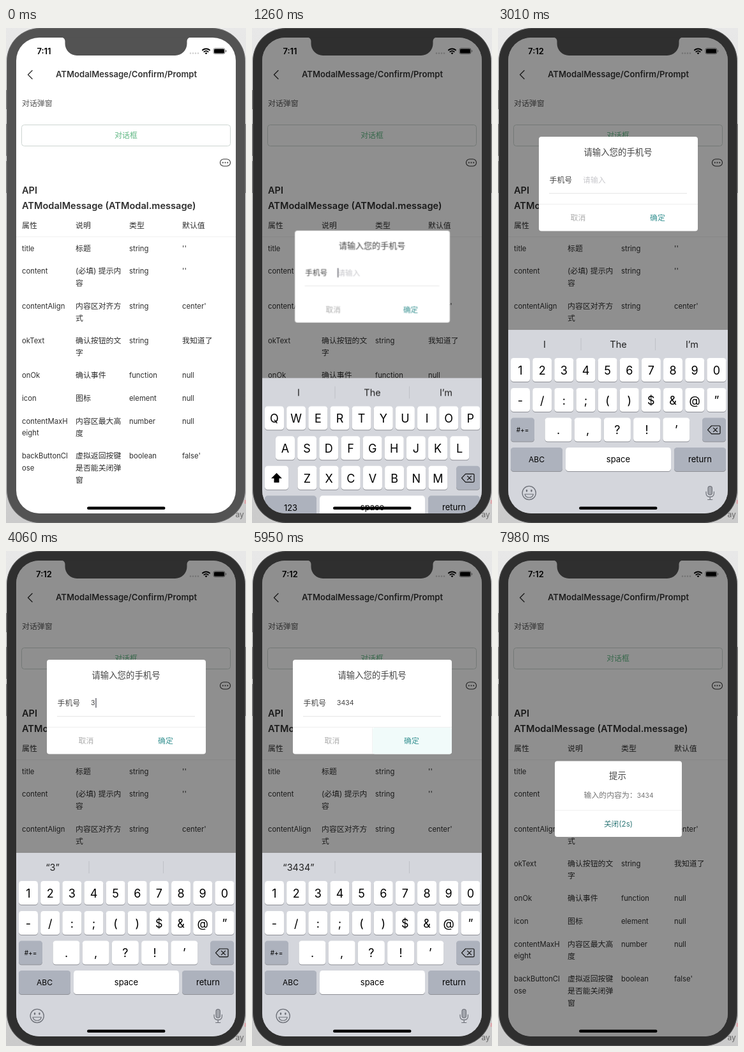
An HTML page for the animation above (8 s loop, 376x774 px).

```html
<!DOCTYPE html>
<html lang="zh-CN">
<head>
<meta charset="utf-8">
<title>Modal prompt demo</title>
<style>
html, body { margin: 0; width: 100%; height: 100%; overflow: hidden; }
body { background: linear-gradient(#e8e8e8, #cbcbcb); }
svg { display: block; width: 376px; height: 774px; }
text { font-family: Inter, "Noto Sans CJK SC", "Noto Sans CJK", "Noto Sans", sans-serif; white-space: pre; }
.bezel, .mask, .lift, .pop, .notice, .board { animation: 8s linear infinite; }
.bezel { animation-name: bezel; }
.mask { animation-name: mask; }
.lift { animation-name: lift; }
.pop { animation-name: pop; transform-origin: 188.5px 243.5px; }
.notice { animation-name: notice; transform-origin: 188.5px 388px; }
.board { animation-name: board; }

@keyframes bezel {
  0%, 9.7% { fill: #535353; }
  10.4%, 100% { fill: #2f2f2f; }
}
@keyframes mask {
  0%, 12.4% { opacity: 0; }
  15%, 100% { opacity: 1; }
}
@keyframes lift {
  0%, 15.9% { transform: translateY(145px); animation-timing-function: cubic-bezier(.2, .8, .2, 1); }
  20.2%, 100% { transform: none; }
}
@keyframes pop {
  0%, 13.1% { opacity: 0; transform: scale(.65); animation-timing-function: ease-out; }
  15% { opacity: 1; }
  16.5%, 74.8% { opacity: 1; transform: none; }
  75.7%, 100% { opacity: 0; transform: scale(.9); }
}
@keyframes notice {
  0%, 75.4% { opacity: 0; transform: scale(.7); animation-timing-function: ease-out; }
  76.8% { opacity: 1; }
  77.3%, 100% { opacity: 1; transform: none; }
}
@keyframes board {
  0%, 14.45% { transform: translateY(302px); animation-timing-function: cubic-bezier(.2, .8, .2, 1); }
  19.95%, 75.49% { transform: none; animation-timing-function: cubic-bezier(.2, .8, .2, 1); }
  80.99%, 100% { transform: translateY(258px); }
}
</style>
</head>
<body>
<svg id="stage" viewBox="0 0 376 774" xmlns="http://www.w3.org/2000/svg"></svg>
<script>
const LOOP = 8000;
const NUMBER = '3434';
const TYPED_AT = [4010, 4480, 4830, 5180, 6060];

const hasHan = s => /[\u4e00-\u9fff]/.test(s);

// y is the middle of the line
function text(x, y, str, { size = hasHan(str) ? 11.9 : 11.3, fill = '#2e2e2e', mid = false, weight = 400 } = {}) {
  return `<text x="${x}" y="${y + size * .37}" font-size="${size}" fill="${fill}" font-weight="${weight}"` +
    `${mid ? ' text-anchor="middle"' : ''}>${str.replace(/&/g, '&amp;')}</text>`;
}
const centered = (x, y, str, size, fill, weight) => text(x, y, str, { size, fill, weight, mid: true });
const rect = (x, y, w, h, fill, r = 0) =>
  `<rect x="${x}" y="${y}" width="${w}" height="${h}" rx="${r}" fill="${fill}"/>`;
const line = (d, stroke, width = 1) =>
  `<path d="${d}" fill="none" stroke="${stroke}" stroke-width="${width}" stroke-linecap="round" stroke-linejoin="round"/>`;
const during = (spans, body) => `<g data-on="${spans}">${body}</g>`;

function table() {
  const cols = [25, 109, 193, 276];
  const rows = [
    [309, '属性', '说明', '类型', '默认值'],
    [344.5, 'title', '标题', 'string', "''"],
    [380, 'content', '(必填) 提示内|容', 'string', "''"],
    [434.5, 'contentAlign', '内容区对齐方|式', 'string', "center'"],
    [489, 'okText', '确认按钮的文|字', 'string', '我知道了'],
    [543, 'onOk', '确认事件', 'function', 'null'],
    [579, 'icon', '图标', 'element', 'null'],
    [614.5, 'contentMaxH|eight', '内容区最大高|度', 'number', 'null'],
    [669, 'backButtonCl|ose', '虚拟返回按键|是否能关闭弹|窗', 'boolean', "false'"]
  ];
  return rows.map(([y, ...cells]) => cells.map((cell, c) =>
    cell.split('|').map((part, i) => text(cols[c], y + i * 18.6, part)).join('')).join('')).join('');
}

function page() {
  return rect(16, 15, 344, 744, '#fff') +
    line('M41 66.5L34.5 73L41 79.5', '#333', 1.4) +
    centered(188.5, 72.5, 'ATModalMessage/Confirm/Prompt', 13.1, '#333', 600) +
    text(25, 117.5, '对话弹窗', { fill: '#555' }) +
    '<rect x="24.5" y="151.5" width="327" height="33" rx="4" fill="none" stroke="#cdd5d1"/>' +
    centered(188, 168, '对话框', 11.9, '#62b885') +
    '<rect x="335.5" y="205" width="16" height="11" rx="5.5" fill="none" stroke="#333" stroke-width="1.1"/>' +
    [339.8, 343.5, 347.2].map(x => `<circle cx="${x}" cy="210.5" r="1" fill="#333"/>`).join('') +
    text(25, 254, 'API', { size: 14.6, weight: 600 }) +
    text(25, 278, 'ATModalMessage (ATModal.message)', { size: 14.6, weight: 600 }) +
    rect(16, 326, 344, 1, '#f0f0f0') +
    table();
}

function statusBar() {
  const clock = t => centered(59.5, 36, t, 13, '#000', 600);
  return during('0-2100', clock('7:11')) + during('2100-8000', clock('7:12')) +
    [289, 293, 297, 301].map(x => `<circle cx="${x}" cy="39.5" r="1.2" fill="#000" opacity=".2"/>`).join('') +
    line('M308 34.6a8 8 0 0 1 11 0', '#000', 2) +
    line('M310.3 37.2a4.7 4.7 0 0 1 6.4 0', '#000', 1.8) +
    '<path d="M311.6 39.2a2.8 2.8 0 0 1 3.8 0L313.5 41.2Z"/>' +
    '<rect x="325" y="31.8" width="18" height="8.6" rx="2.4" fill="none" stroke="#000" stroke-opacity=".6" stroke-width=".8"/>' +
    rect(326, 32.8, 16, 6.6, '#000', 1.5) + rect(344, 34.6, 1.2, 3, '#555', .6);
}

function prompt() {
  const caret = x => rect(x, 230, 1.5, 15, '#6a6a74');
  const typed = [...NUMBER].map((_, i) => {
    const end = TYPED_AT[i + 1];
    return during(`${TYPED_AT[i]}-${end}`, text(133, 237.5, NUMBER.slice(0, i + 1), { size: 10.5, fill: '#444' })) +
      during(`${TYPED_AT[i]}-${Math.min(end, 5700)}`, caret(133.5 + 6.7 * (i + 1)));
  }).join('');
  return `<g class="lift"><g class="pop">${
    rect(64, 170, 249, 147.5, '#fff', 4) +
    centered(188, 194, '请输入您的手机号', 13.4, '#444') +
    text(80.5, 237.5, '手机号', { fill: '#444' }) +
    during('0-4010', text(133, 237.5, '请输入', { fill: '#c9c9cd' })) +
    during('1050-1830 2350-2700 3250-3660', caret(132.5)) +
    typed +
    rect(80, 258, 216, 1, '#e6e6e6') +
    during('5870-6060', rect(189, 276, 124, 41.5, '#f1fbfa', 4) + rect(188, 276, 1, 41, '#f3f3f3')) +
    during('1320-6060', rect(64, 275, 249, 1, '#efefef')) +
    centered(125.5, 297, '取消', 11.9, '#adadad') +
    centered(250, 297, '确定', 11.9, '#3b9494')
  }</g></g>`;
}

function notice() {
  const close = s => centered(188.5, 427, `关闭(${s}s)`, 11.7, '#2f7777');
  return `<g class="notice">${
    rect(89, 328.5, 199, 118.5, '#fff', 4) +
    centered(187.5, 351.5, '提示', 13.4, '#444', 500) +
    `<text x="134.5" y="386" font-size="11.9" fill="#757575">输入的内容为：<tspan font-size="10.2">${NUMBER}</tspan></text>` +
    during('6200-8000', rect(89, 405, 199, 1, '#f0f0f0')) +
    during('6000-7040', close(3)) + during('7040-8000', close(2))
  }</g>`;
}

const GREY = '#adb2bd';
const key = (x, y, w, fill = '#fff') => rect(x, y + 1, w, 37, '#8e9096', 4.5) + rect(x, y, w, 37, fill, 4.5);
const keyRow = (chars, first, y, pitch = 34.15, w = 30) => [...chars].map((c, i) => {
  const x = first + i * pitch;
  return key(x - w / 2, y, w) + centered(x, y + 19, c, 18, '#000');
}).join('');

// Enlarged key shown while a digit is held down
function keyPopup(digit) {
  const x = 35 + (digit - 1) * 34.15;
  return `<path transform="translate(${x} 0)" fill="#fff" stroke="#b4b7bd" stroke-width=".7"
    d="M-17 464h34q7 0 7 7v26c0 9-9 9-9 19v33q0 4-4 4h-22q-4 0-4-4v-33c0-10-9-10-9-19v-26q0-7 7-7z"/>` +
    centered(x, 488, digit, 27, '#000');
}

function keyboard() {
  const shift = '<path d="M38.5 620.5L47 629H42.5V635.5H34.5V629H30Z"/>';
  const letters = keyRow('QWERTYUIOP', 35, 516) + keyRow('ASDFGHJKL', 52, 563) +
    keyRow('ZXCVBNM', 86.5, 609.5) + key(20, 609.5, 37) + shift + centered(60.5, 674.5, '123', 13, '#000');
  const symbols = keyRow('1234567890', 35, 516) + keyRow('-/:;()$&@”', 35, 563) +
    keyRow('.,?!’', 94.5, 609.5, 46.2, 42) + key(20, 609.5, 37, GREY) +
    centered(38.5, 628.5, '#+=', 10, '#000') + centered(60.5, 674.5, 'ABC', 12, '#000');
  const hint = (x, s) => centered(x, 494.5, s, 14.5, '#222');
  const hints = rect(16, 472, 344, 38, '#d4d6dc') +
    rect(129.5, 485, 1, 19, '#bec0c6') + rect(246, 485, 1, 19, '#bec0c6') +
    during('0-4010', hint(73, 'I') + hint(188.5, 'The') + hint(304, 'I’m')) +
    [...NUMBER].map((_, i) => during(`${TYPED_AT[i]}-${TYPED_AT[i + 1]}`, hint(73, `“${NUMBER.slice(0, i + 1)}”`))).join('');
  const erase = line('M328.5 628.3L334.5 622H346.5Q348 622 348 623.5V633.2Q348 634.7 346.5 634.7H334.5Z', '#111', 1.2) +
    line('M337.5 625.3l6 6m0-6l-6 6', '#111', 1.2);
  const emoji = '<circle cx="48.7" cy="727" r="10.6" fill="none" stroke="#6d7078" stroke-width="1.3"/>' +
    '<ellipse cx="45" cy="723.5" rx="1.2" ry="1.9" fill="#6d7078"/><ellipse cx="52.4" cy="723.5" rx="1.2" ry="1.9" fill="#6d7078"/>' +
    line('M42 729H55.4Q54 734.3 48.7 734.3T42 729Z', '#6d7078', 1.1);
  const mic = '<rect x="329" y="716.5" width="6.4" height="13.5" rx="3.2" fill="#a3a6ad" stroke="#6d7078" stroke-width="1.1"/>' +
    line('M326 725v2.2q0 6 6.2 6t6.2-6V725M332.2 733.2v4.3M328.6 737.5h7.2', '#6d7078', 1.2);
  const popups = [...NUMBER].map((d, i) =>
    during(`${TYPED_AT[i] - 110}-${TYPED_AT[i] - 5}`, keyPopup(d))).join('');

  return `<g class="board">${
    rect(16, 509, 344, 252, '#d4d6dc') +
    during('0-6040', hints) +
    key(20, 656, 81, GREY) + key(106, 656, 165) + key(276, 656, 81, GREY) + key(320, 609.5, 37, GREY) +
    centered(188.5, 674, 'space', 13, '#000') + centered(316.5, 674, 'return', 13, '#000') +
    erase + emoji + mic +
    during('0-2800', letters) + during('2800-8000', symbols) +
    popups
  }</g>`;
}

function phone() {
  const buttons = [[0, 97, 30], [0, 150, 50], [0, 208, 50], [374, 150, 108]]
    .map(([x, y, h]) => rect(x, y, 2, h, '#8a8a8a')).join('');
  const body = '<rect class="bezel" x="1" y="0" width="374" height="774" rx="52"/>' +
    '<rect x="1.5" y=".5" width="373" height="773" rx="51.5" fill="none" stroke="#888" stroke-opacity=".4"/>';
  const notch = '<path class="bezel" d="M86.5 14.5a6 6 0 0 1 6 6v4a18.5 18.5 0 0 0 18.5 18.5' +
    'h154a18.5 18.5 0 0 0 18.5-18.5v-4a6 6 0 0 1 6-6z"/>';
  return rect(373.5, 738, 2.5, 6, '#dfa9ae') + text(359.5, 761, 'ay', { size: 12, fill: '#666' }) +
    buttons + body +
    '<clipPath id="screen"><rect x="16" y="15" width="344" height="744" rx="36"/></clipPath>' +
    `<g clip-path="url(#screen)">${
      page() + `<g class="mask">${rect(16, 15, 344, 744, 'rgba(0,0,0,.44)')}</g>` +
      statusBar() + prompt() + notice() + keyboard() + rect(127, 748.4, 122.5, 4.6, '#000', 2.3)
    }</g>` + notch;
}

document.getElementById('stage').innerHTML = phone();

// Hard on/off switching for every element with time spans
for (const el of document.querySelectorAll('[data-on]')) {
  const spans = el.dataset.on.split(' ').map(s => s.split('-').map(Number));
  const frames = spans.flatMap(([from, to]) =>
    [{ offset: from / LOOP, opacity: 1 }, { offset: to / LOOP, opacity: 0 }]);
  if (frames[0].offset > 0) frames.unshift({ offset: 0, opacity: 0 });
  if (frames.at(-1).offset < 1) frames.push({ offset: 1, opacity: 0 });
  el.animate(frames.map(f => ({ ...f, easing: 'steps(1, end)' })), { duration: LOOP, iterations: Infinity });
}
</script>
</body>
</html>
```
